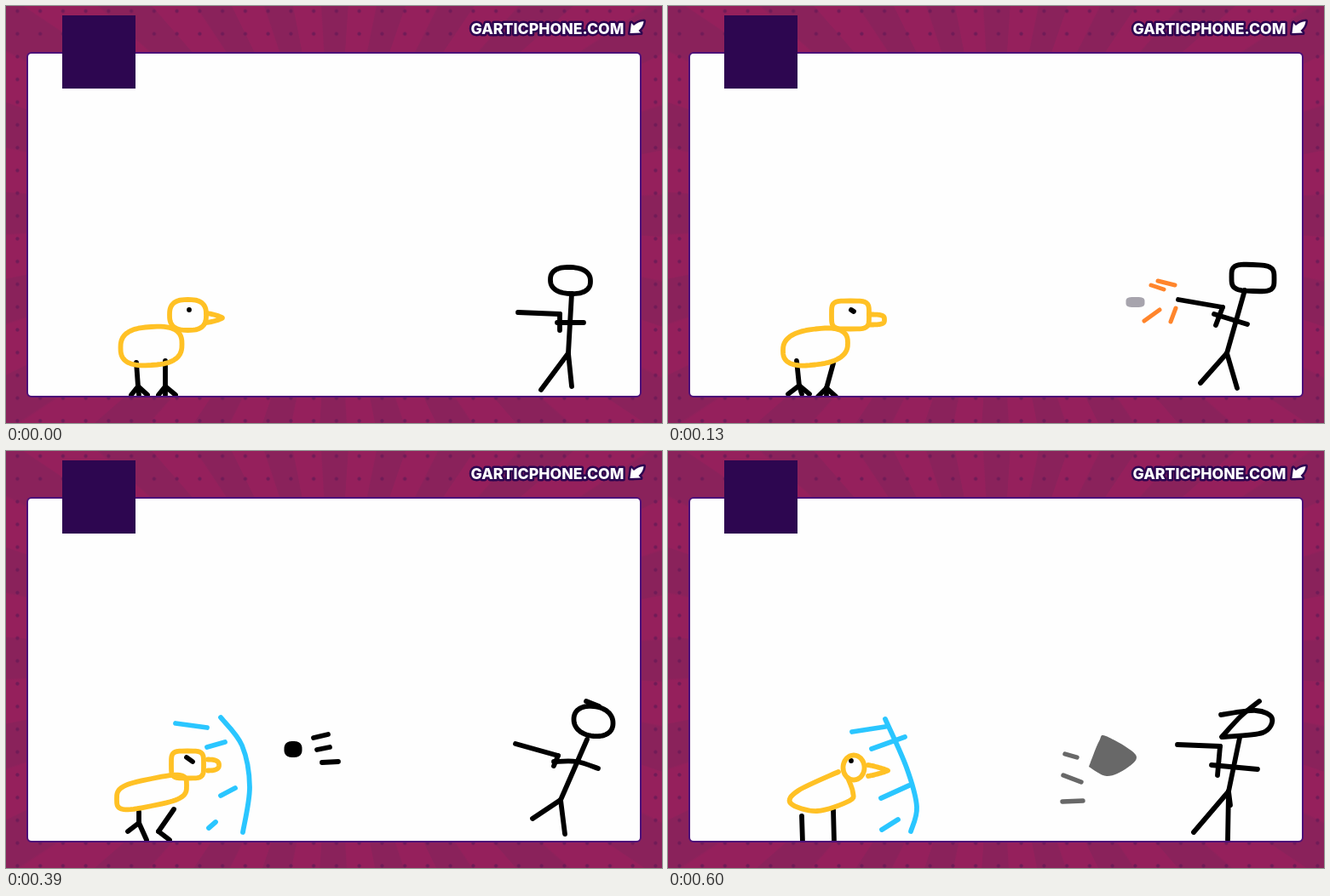
Animation of 770x490 px, one loop 650 ms. Source, as an HTML page with a canvas:

```html
<!DOCTYPE html>
<html lang="en">
<head>
<meta charset="utf-8">
<title>Bird and shot</title>
<style>
  html, body { margin: 0; width: 100%; height: 100%; overflow: hidden; }
  body {
    position: relative;
    background:
      radial-gradient(circle, #701b57 1.6px, #701b5700 2.6px) 0 46.1px / 26.75px 26.75px,
      repeating-conic-gradient(from 4deg at 385px 245px, #95205c 0 7.3deg, #8a225b 7.7deg 14.8deg, #95205c 15deg);
  }
  #panel {
    position: absolute; left: 24px; top: 54px; width: 718px; height: 402px;
    border: 2px solid #4c1079; border-radius: 6px; background: #fefefe; overflow: hidden;
  }
  canvas { position: absolute; left: -26px; top: -56px; }
  svg { position: absolute; left: 0; top: 0; }
  text { font: 800 17.7px Inter, "Open Sans", sans-serif; }
  .outlined { fill: #fff; stroke: #2d0650; stroke-width: 5; stroke-linejoin: round; paint-order: stroke; }
</style>
</head>
<body>
<div id="panel"><canvas width="770" height="490"></canvas></div>
<svg width="770" height="490">
  <rect x="66" y="11" width="86" height="86" fill="#2d0650"/>
  <text class="outlined" x="545.5" y="33">GARTICPHONE.COM</text>
  <path class="outlined" d="M734 20L732.5 32L745 31.5L742.5 29Q748 24 748.5 18Q742 18.5 737 23Z"/>
</svg>
<script>
const ctx = document.querySelector("canvas").getContext("2d");
ctx.lineCap = ctx.lineJoin = "round";

const YELLOW = "#ffc125", BLACK = "#000", BLUE = "#2ac6ff", ORANGE = "#ff852c";
const STEP = 130;

function pen(color, width = 5.8) {
  ctx.strokeStyle = ctx.fillStyle = color;
  ctx.lineWidth = width;
}

// Superellipse: shear tilts it, power squares it off (2 is round, 1 is pointed)
function oval(x, y, rx, ry, shear = 0, power = 2, from = -Math.PI, to = Math.PI) {
  const bend = v => Math.sign(v) * Math.abs(v) ** (2 / power);
  const path = new Path2D();
  for (let i = 0; i <= 60; i++) {
    const angle = from + (to - from) * i / 60;
    const dx = rx * bend(Math.cos(angle));
    path.lineTo(x + dx, y + ry * bend(Math.sin(angle)) + shear * dx);
  }
  return path;
}

// Smooth curve through x, y pairs
function curve(...n) {
  const last = n.length / 2 - 1;
  const at = (i, axis) => n[2 * Math.max(0, Math.min(last, i)) + axis];
  const handle = (i, sign) => [0, 1].map(a => at(i, a) + sign * (at(i + 1, a) - at(i - 1, a)) / 6);
  const path = new Path2D();
  path.moveTo(n[0], n[1]);
  for (let i = 0; i < last; i++) {
    path.bezierCurveTo(...handle(i, 1), ...handle(i + 1, -1), at(i + 1, 0), at(i + 1, 1));
  }
  return path;
}

const draw = (...paths) => paths.forEach(path => ctx.stroke(path));
const line = (...ends) => draw(curve(...ends));

function leg(x, y, footX, footY, ...toes) {
  line(x, y, footX, footY);
  for (const dx of toes) line(footX, footY, footX + dx, footY + 10);
}

function bird({ body, head, beak: [x, y, length, gape, power], eye, legs }) {
  pen(BLACK);
  legs.forEach(l => leg(...l));
  line(...eye);
  pen(YELLOW);
  draw(body, head, oval(x, y, length, gape, 0, power, -Math.PI / 2, Math.PI / 2));
}

function shooter({ head, neck, hip, feet, hand, wrist, grip, arm }) {
  pen(BLACK);
  draw(...head);
  line(...neck, ...hip);
  for (const foot of feet) line(...hip, ...foot);
  line(...hand, ...wrist);
  line(...wrist, ...grip);
  line(...arm);
}

const scenes = [
  function aim() {
    bird({
      body: oval(170.5, 399.5, 36, 22.5, -.06, 2.7), head: oval(213.5, 363, 21.5, 18, 0, 2.7),
      beak: [235, 366.5, 19, 5.5, 1.3], eye: [215, 357, 215, 357],
      legs: [[153, 419, 155, 447, -8, 1, 11], [187, 417, 187, 447, -8, 0, 12]],
    });
    shooter({
      head: [oval(662.5, 322.5, 23.5, 15.5, .04, 2.4)], neck: [664, 338], hip: [660, 408],
      feet: [[628, 451], [664, 447]], hand: [601, 360], wrist: [650, 362], grip: [650, 381],
      arm: [647, 372, 678, 372],
    });
  },
  function fire() {
    bird({
      body: oval(173, 400.5, 38, 21, -.12, 2.6), head: oval(214, 363, 22, 16.5, 0, 4.5),
      beak: [236, 368.5, 18, 6, 3.5], eye: [215, 357, 218, 359],
      legs: [[151, 417, 154, 446, -13, 3, 12], [194, 420, 186, 449, -10, 0, 11]],
    });
    shooter({
      head: [oval(686.5, 319.5, 25, 15.5, .04, 3.8)], neck: [677, 334], hip: [656, 408],
      feet: [[625, 443], [668, 449]], hand: [599, 345], wrist: [651, 354], grip: [643, 375],
      arm: [641, 362, 680, 374],
    });
    pen("#a7a4ad");
    ctx.fill(oval(548.5, 348, 11, 6, 0, 3.5));
    pen(ORANGE, 5);
    line(567, 328, 582, 333);
    line(575, 323, 595, 328);
    line(577, 357, 559, 370);
    line(596, 355, 590, 371);
  },
  function flight() {
    bird({
      body: oval(168, 401, 40, 18, -.17, 3.8), head: oval(212.5, 367, 22.5, 18, .08, 2.7),
      beak: [236, 369, 21, 8.5, 1.15], eye: [215, 359, 218, 362],
      legs: [[151, 420, 153, 444, -16, 5, 13], [190, 419, 181, 447, -2, 7, 12]],
    });
    shooter({
      head: [oval(689, 320, 23.5, 20, .04, 2.2)], neck: [682, 335], hip: [653, 408],
      feet: [[621, 440], [663, 450]], hand: [599, 344], wrist: [660, 354], grip: [643, 376],
      arm: [645, 361, 687, 370],
    });
    pen("#aaa");
    ctx.fill(oval(415.5, 345.5, 11, 8.5, 0, 3));
    pen("#646468", 5.4);
    line(437, 331, 453, 333);
    line(444, 345, 460, 347);
    line(427, 358, 440, 357);
  },
  function shield() {
    bird({
      body: oval(171, 401, 41, 16, -.2, 3.6), head: oval(213, 368.5, 19, 16, 0, 4.5),
      beak: [237, 369, 13, 6.5, 2.6], eye: [212, 360, 219, 365],
      legs: [[156, 424, 156, 437, -13], [156, 437, 165, 457], [197, 421, 179, 447, 13]],
    });
    shooter({
      head: [oval(689.5, 317.5, 23, 17.5, .1, 2.2), curve(681, 294, 696, 300)], neck: [682, 339], hip: [651, 410],
      feet: [[618, 432], [656, 450]], hand: [598, 344], wrist: [648, 358], grip: [643, 370],
      arm: [643, 365, 670, 365, 695, 373],
    });
    pen(BLUE);
    line(252, 313, 277, 346, 286, 395, 278, 448);
    line(199, 320, 236, 325);
    line(236, 348, 257, 342);
    line(269, 396, 252, 405);
    line(246, 436, 238, 443);
    pen(BLACK);
    ctx.fill(oval(337, 350.5, 10.5, 9.5, 0, 2.6));
    line(361, 337, 378, 333);
    line(365, 351, 380, 348);
    line(371, 366, 390, 365);
  },
  function rebound() {
    bird({
      body: curve(211, 384, 217, 401, 213, 411, 175, 423, 144, 414, 153, 399, 200, 377),
      head: oval(218, 372, 12.5, 14.5),
      beak: [235, 375.5, 23, 6.5, 1.15], eye: [215, 364, 215, 364],
      legs: [[157, 429, 158, 460], [194, 421, 195, 460]],
    });
    shooter({
      head: [curve(694, 294, 672, 312, 650, 336), curve(649, 310, 690, 305, 709, 314, 698, 331, 651, 336)],
      neck: [671, 337], hip: [658, 400],
      feet: [[617, 448], [657, 457], [660, 416]], hand: [598, 345], wrist: [648, 347], grip: [645, 381],
      arm: [638, 369, 692, 374],
    });
    pen(BLUE);
    line(255, 315, 280, 372, 292, 418, 285, 447);
    line(216, 330, 255, 324);
    line(239, 350, 278, 336);
    line(250, 408, 283, 393);
    line(251, 445, 270, 433);
    pen("#686868", 5.4);
    ctx.fill(curve(494, 371, 506, 341, 514, 335, 549, 357, 538, 373, 515, 382, 494, 371));
    line(466, 356, 480, 360);
    line(464, 381, 485, 389);
    line(463, 412, 487, 411);
  },
];

const start = performance.now();
function tick() {
  const time = performance.now() - start;
  ctx.clearRect(0, 0, 770, 490);
  scenes[Math.floor(time / STEP) % scenes.length]();
  requestAnimationFrame(tick);
}
tick();
</script>
</body>
</html>
```
